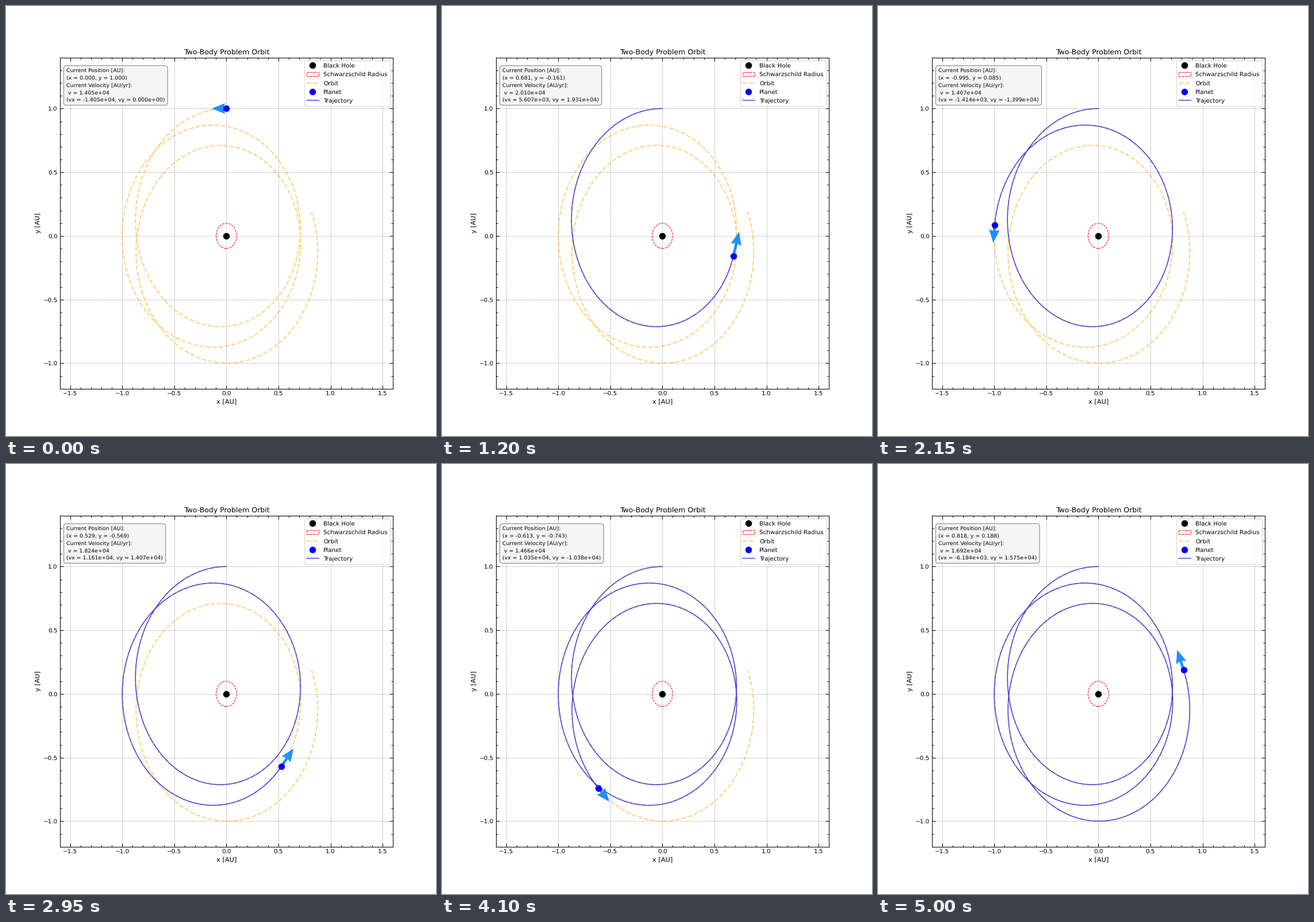
Write a matplotlib script that moves like this. It is 748x748 px and loops after 5050 ms.

```python
import numpy as np
import matplotlib.pyplot as plt
from matplotlib.animation import FuncAnimation
from matplotlib.patches import Circle
from matplotlib.ticker import AutoMinorLocator, MultipleLocator

plt.rcParams.update({"font.family": "DejaVu Sans", "font.size": 10,
                     "text.hinting": "none", "axes.linewidth": 1.0})

FRAMES = 101
SUB = 10                          # orbit samples per frame

# Units: AU, year, solar mass
GM = 4 * np.pi**2 * 5e6
C = 63241.077
RS = 2 * GM / C**2
V0 = np.sqrt(GM)
T_END = 2 * 2 * np.pi / V0        # two Kepler periods at 1 AU

# Dormand-Prince 5(4) coefficients
A = [[1/5],
     [3/40, 9/40],
     [44/45, -56/15, 32/9],
     [19372/6561, -25360/2187, 64448/6561, -212/729],
     [9017/3168, -355/33, 46732/5247, 49/176, -5103/18656]]
B = np.array([35/384, 0, 500/1113, 125/192, -2187/6784, 11/84])
E = np.array([-71/57600, 0, 71/16695, -71/1920, 17253/339200, -22/525, 1/40])
P = np.array([
    [1, -8048581381/2820520608, 8663915743/2820520608, -12715105075/11282082432],
    [0, 0, 0, 0],
    [0, 131558114200/32700410799, -68118460800/10900136933, 87487479700/32700410799],
    [0, -1754552775/470086768, 14199869525/1410260304, -10690763975/1880347072],
    [0, 127303824393/49829197408, -318862633887/49829197408, 701980252875/199316789632],
    [0, -282668133/205662961, 2019193451/616988883, -1453857185/822651844],
    [0, 40617522/29380423, -110615467/29380423, 69997945/29380423]])


def deriv(s):
    """Newtonian gravity plus the first relativistic correction."""
    x, y, vx, vy = s
    r2 = x * x + y * y
    spin = x * vy - y * vx
    g = -GM / r2**1.5 * (1 + 3 * spin**2 / (C**2 * r2))
    return np.array([vx, vy, g * x, g * y])


def rms(a):
    return np.sqrt(np.mean(a**2))


def first_step(s, f, rtol, atol):
    scale = atol + np.abs(s) * rtol
    d0, d1 = rms(s / scale), rms(f / scale)
    h0 = 0.01 * d0 / d1
    d2 = rms((deriv(s + h0 * f) - f) / scale) / h0
    return min(100 * h0, (0.01 / max(d1, d2))**0.2)


def integrate(s, times, rtol=1e-5, atol=1e-6):
    """Adaptive Runge-Kutta with dense output at the given times."""
    out = np.empty((len(times), 4))
    out[0] = s
    done, t, f = 1, 0.0, deriv(s)
    h = first_step(s, f, rtol, atol)
    while done < len(times):
        rejected = False
        while True:
            h = min(h, times[-1] - t)
            k = [f]
            for row in A:
                k.append(deriv(s + h * np.dot(row, k)))
            new = s + h * (B @ np.array(k))
            k.append(deriv(new))
            k = np.array(k)
            scale = atol + np.maximum(np.abs(s), np.abs(new)) * rtol
            err = max(rms(h * (E @ k) / scale), 1e-12)
            step, gain = h, 0.9 * err**-0.2
            if err < 1:
                h *= min(1 if rejected else 10, gain)
                break
            h *= max(0.2, gain)
            rejected = True
        t_new = t + step
        if times[-1] - t_new < 1e-9 * times[-1]:
            t_new = times[-1]
        while done < len(times) and times[done] <= t_new:
            q = (times[done] - t) / step
            out[done] = s + step * (q ** np.arange(1, 5)) @ (P.T @ k)
            done += 1
        t, s, f = t_new, new, k[-1]
    return out


times = np.linspace(0, T_END, (FRAMES - 1) * SUB + 1)
path = integrate(np.array([0.0, 1.0, -V0, 0.0]), times)


def caption(x, y, vx, vy):
    return (f"Current Position [AU]:\n(x = {x:.3f}, y = {y:.3f})\n"
            f"Current Velocity [AU/yr]:\n v = {np.hypot(vx, vy):.3e}\n"
            f"(vx = {vx:.3e}, vy = {vy:.3e})")


fig, ax = plt.subplots(figsize=(10, 10), dpi=74.8)
ax.set(xlim=(-1.6, 1.6), ylim=(-1.2, 1.4))
ax.set_title("Two-Body Problem Orbit", fontsize=12)
ax.set_xlabel("x [AU]", fontsize=11)
ax.set_ylabel("y [AU]", fontsize=11)
for axis in (ax.xaxis, ax.yaxis):
    axis.set_major_locator(MultipleLocator(0.5))
    axis.set_minor_locator(AutoMinorLocator(5))
ax.tick_params(which="both", direction="in", top=True, right=True, width=1)
ax.tick_params(which="major", length=6)
ax.tick_params(which="minor", length=3)
ax.grid(True, color="gray", linestyle="--", linewidth=0.5)

hole, = ax.plot([0], [0], "o", color="black", ms=10, label="Black Hole")
ring = ax.add_patch(Circle((0, 0), RS, fill=False, edgecolor="red",
                           linestyle="--", linewidth=1,
                           label="Schwarzschild Radius"))
orbit, = ax.plot(path[:, 0], path[:, 1], "--", color="orange", lw=2,
                 alpha=0.5, label="Orbit")
trail, = ax.plot([], [], color="blue", lw=1.5, alpha=0.7, label="Trajectory")
arrow = ax.quiver([0], [1], [-V0], [0], color="dodgerblue", angles="xy",
                  scale_units="xy", scale=1e5, width=0.008, headwidth=4,
                  zorder=3)
planet, = ax.plot([0], [1], "o", color="blue", ms=10, label="Planet", zorder=4)
info = ax.text(0.02, 0.9675, "", transform=ax.transAxes, fontsize=9, va="top",
               linespacing=1.58, zorder=5,
               bbox=dict(boxstyle="round,pad=0.5", facecolor="whitesmoke",
                         edgecolor="gray"))
ax.legend(handles=[hole, ring, orbit, planet, trail], loc="upper right",
          labelspacing=0.54, borderpad=0.42)


def update(frame):
    i = frame * SUB
    x, y, vx, vy = path[i]
    trail.set_data(path[:i + 1, 0], path[:i + 1, 1])
    planet.set_data([x], [y])
    arrow.set_offsets([[x, y]])
    arrow.set_UVC([vx], [vy])
    info.set_text(caption(x, y, vx, vy))
    return trail, arrow, planet, info


anim = FuncAnimation(fig, update, frames=FRAMES, interval=50,
                     init_func=lambda: update(0), repeat=True, repeat_delay=0)
plt.show()
```
